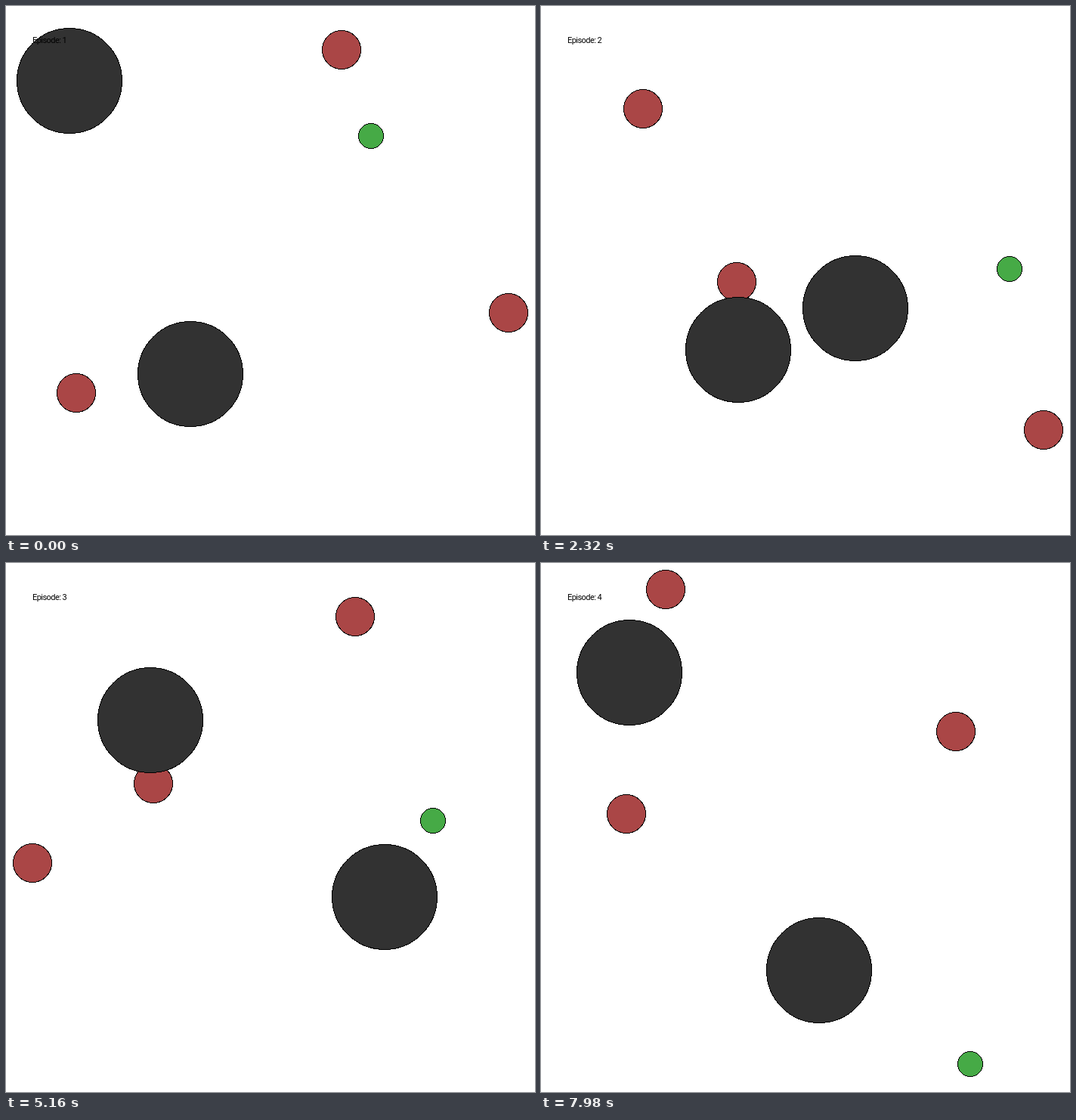
An HTML page for the animation above (8 s loop, 700 px wide and 700 px high).

```html
<!DOCTYPE html>
<html lang="en">
<head>
<meta charset="utf-8">
<title>Pursuit episodes</title>
<style>
  html, body { margin: 0; width: 100%; height: 100%; overflow: hidden; background: #fff; }
  svg { display: block; width: 100%; height: 100%; }
  circle { stroke: #000; stroke-width: 1; shape-rendering: crispEdges; }
  text { font: 11px Roboto, Arial, sans-serif; letter-spacing: -0.54px; }
</style>
</head>
<body>
<svg id="stage" viewBox="0 0 700 700"></svg>
<script>
const LOOP = 8000, EPISODE = 2320, FIRST = 20, STEP = 100;
const CENTER = 350, REACH = 315;
const DT = 0.1, DRAG = 0.75, ACCEL = 3;

const KINDS = {
  chaser: { r: 26, fill: "#aa4646", cap: 1 },
  runner: { r: 17, fill: "#46aa46", cap: 1.3 },
  rock: { r: 70, fill: "#323232", cap: 0 }
};
const ORDER = ["chaser", "chaser", "chaser", "runner", "rock", "rock"];

// Each body: x, y and optional thrust (fx, fy), start velocity (vx, vy), first thrust step (from)
const at = (x, y, extra) => ({ x, y, fx: 0, fy: 0, vx: 0, vy: 0, from: 0, ...extra });
const LEFT = { fx: -1 }, UP = { fy: -1 };

const EPISODES = [
  [at(0.2978, -0.9227), at(-0.8108, 0.5137, LEFT), at(0.9957, 0.1786),
   at(0.422, -0.5611), at(-0.8407, -0.7918), at(-0.3335, 0.4334)],
  [at(-0.6813, -0.6765), at(0.9994, 0.6706, UP), at(-0.288, 0.0477, LEFT),
   at(0.8578, -0.0053), at(-0.2807, 0.3357), at(0.21, 0.1596)],
  [at(0.748, -0.826, { fx: -0.64, fy: -0.853 }), at(-0.657, -0.245), at(-0.914, 0.2025, LEFT),
   at(0.7183, 0.2763, { vx: 0.803, vy: -1.259 }), at(-0.6714, -0.6004), at(0.643, 0.3943)],
  [at(0.3671, -0.9535, LEFT), at(0.6039, 0.5426, UP), at(-0.619, -0.053, { fx: -0.64, from: 8 }),
   at(0.6614, 0.949), at(-0.7038, -0.619), at(0.056, 0.5736)]
];

// Damped motion with a speed limit
function locate(body, cap, steps) {
  let { x, y, vx, vy } = body;
  for (let i = 0; i < steps; i++) {
    const push = i >= body.from ? ACCEL * DT : 0;
    vx = vx * DRAG + body.fx * push;
    vy = vy * DRAG + body.fy * push;
    const speed = Math.hypot(vx, vy);
    if (speed > cap) {
      vx *= cap / speed;
      vy *= cap / speed;
    }
    x += vx * DT;
    y += vy * DT;
  }
  return [x, y];
}

const stage = document.getElementById("stage");
function add(tag, attrs) {
  const el = document.createElementNS(stage.namespaceURI, tag);
  for (const name in attrs) el.setAttribute(name, attrs[name]);
  return stage.appendChild(el);
}

const circles = ORDER.map(kind =>
  add("circle", { r: KINDS[kind].r - 0.5, fill: KINDS[kind].fill }));
const label = add("text", { x: 35, y: 49 });

let shown = "";
function render(time) {
  const t = time % LOOP;
  const index = Math.floor(t / EPISODE);
  const local = t - index * EPISODE;
  const step = local < FIRST ? 0 : 1 + Math.floor((local - FIRST) / STEP);
  const key = index + ":" + step;
  if (key === shown) return;
  shown = key;

  const points = EPISODES[index].map((body, i) => locate(body, KINDS[ORDER[i]].cap, step));
  // The view widens so that the farthest body stays inside
  const range = Math.max(...points.flat().map(Math.abs));
  const toPixel = v => Math.floor(CENTER + v / range * REACH);
  points.forEach(([x, y], i) => {
    circles[i].setAttribute("cx", toPixel(x));
    circles[i].setAttribute("cy", toPixel(y));
  });
  label.textContent = "Episode: " + (index + 1);
}

const start = performance.now();
function tick() {
  render(performance.now() - start);
  requestAnimationFrame(tick);
}
tick();
</script>
</body>
</html>
```
